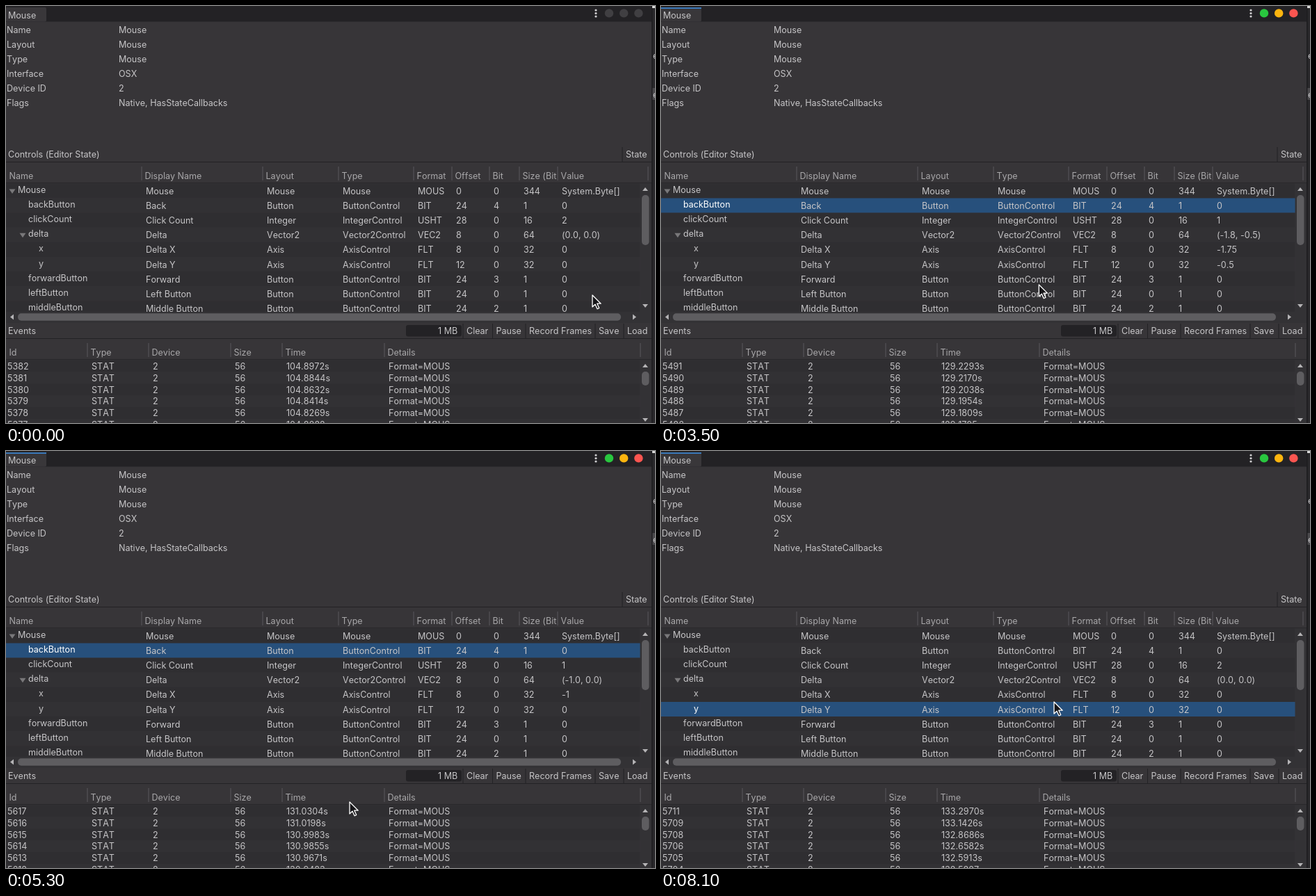
These frames come from a looping animation (933x600 px, 8.6 s). An HTML page:

```html
<!DOCTYPE html>
<html lang="en">
<head>
<meta charset="utf-8">
<title>Mouse</title>
<style>
html, body { margin: 0; width: 100%; height: 100%; overflow: hidden; background: #373538; }
svg { display: block; width: 933px; height: 600px; }
text { font: 12.55px Inter, sans-serif; font-kerning: none; font-feature-settings: "calt" 0; fill: #c6c5c7; white-space: pre; }
.head { fill: #a8a7a9; }
.on { fill: #fff; }
</style>
</head>
<body>
<svg id="stage" viewBox="0 0 933 600"></svg>
<script>
const LOOP = 8600, STEP = 100;
const FOCUS = 21, PRESS = 70, SECOND_PRESS = 75;
const PANEL = '#373538', EDGE = '#232225', THUMB = '#5e5d60', ARROW = '#b5b4b6';
const stripe = i => i % 2 ? '#323134' : '#2f2e31';
const stage = document.getElementById('stage');
let layer = stage;

function add(tag, attrs) {
  const el = document.createElementNS('http://www.w3.org/2000/svg', tag);
  for (const k in attrs) el.setAttribute(k, attrs[k]);
  return layer.appendChild(el);
}
const rect = (x, y, width, height, fill, rx = 0) => add('rect', { x, y, width, height, fill, rx });
const path = (d, fill, more) => add('path', { d, fill, ...more });
const dot = (cx, cy, r, fill) => add('circle', { cx, cy, r, fill });
// y is the middle of the capitals
function label(x, y, str, cls = '') {
  const el = add('text', { x, y: y + 4.6, class: cls });
  el.textContent = str;
  return el;
}
function clipTo(id, x, y, width, height) {
  layer = stage;
  layer = add('clipPath', { id });
  rect(x, y, width, height, '#000');
  layer = stage;
  layer = add('g', { 'clip-path': `url(#${id})` });
}

// Title bar and device info
rect(0, 0, 933, 600, PANEL);
rect(0, 0, 928, 22.5, EDGE);
rect(0, 2, 58, 20.5, '#39373a', 2);
const tabLine = rect(0, 2, 58, 2, '#3a79bb');
label(3, 13, 'Mouse');
for (const y of [6, 10.5, 15]) dot(848, y, 1.6, '#d0cfd1');
const lights = ['#29c73f', '#fdb50f', '#fb5550']
  .map((color, i) => ({ el: dot(867 + 21.2 * i, 10.4, 6.2, color), color }));

Object.entries({
  'Name': 'Mouse', 'Layout': 'Mouse', 'Type': 'Mouse', 'Interface': 'OSX',
  'Device ID': '2', 'Flags': 'Native, HasStateCallbacks'
}).forEach(([key, val], i) => {
  label(1, 34 + i * 21.15, key);
  label(162, 34 + i * 21.15, val);
});

function toolbar(y, title) {
  rect(0, y, 928, 21, PANEL);
  rect(0, y + 21, 928, 1, EDGE);
  label(3, y + 10.5, title);
}
function header(y, names, cols, end) {
  rect(0, y, 928, 29, PANEL);
  rect(0, y + 29, 928, 1, '#29282b');
  for (const x of [...cols.slice(1).map(c => c - 6), end]) rect(x - .5, y + 6, 1, 20, '#5a595c');
  names.forEach((n, i) => label(cols[i] - 1.5, y + 19, n, 'head'));
}
function scrollBar(top, bottom, thumbY, thumbH) {
  rect(912, top, 16, bottom - top, '#333235');
  path(`M915 ${top + 11}l4-5 4 5z`, ARROW);
  path(`M915 ${bottom - 11}l4 5 4-5z`, ARROW);
  rect(914, thumbY, 10.5, thumbH, THUMB, 5);
}

// Controls
toolbar(203, 'Controls (Editor State)');
rect(885.5, 203, 1, 21, EDGE);
label(891, 213.3, 'State');

const cols = [6, 201, 375, 484, 592, 647, 701, 744, 799];
header(225, ['Name', 'Display Name', 'Layout', 'Type', 'Format', 'Offset', 'Bit', '', 'Value'], cols, 923);
clipTo('sizeHead', 738, 225, 53, 30);
label(742.5, 244, 'Size (Bits)', 'head');

const formats = { Mouse: 'MOUS', Button: 'BIT', Integer: 'USHT', Vector2: 'VEC2', Axis: 'FLT' };
const controls = [
  [0, 'Mouse', 'Mouse', 'Mouse', 0, 0, 344],
  [1, 'backButton', 'Back', 'Button', 24, 4, 1],
  [1, 'clickCount', 'Click Count', 'Integer', 28, 0, 16],
  [1, 'delta', 'Delta', 'Vector2', 8, 0, 64],
  [2, 'x', 'Delta X', 'Axis', 8, 0, 32],
  [2, 'y', 'Delta Y', 'Axis', 12, 0, 32],
  [1, 'forwardButton', 'Forward', 'Button', 24, 3, 1],
  [1, 'leftButton', 'Left Button', 'Button', 24, 0, 1],
  [1, 'middleButton', 'Middle Button', 'Button', 24, 2, 1]
];
const PITCH = 21.12;
clipTo('list', 0, 255, 928, 185);
const bars = [], titles = [], values = {};
controls.forEach(([depth, name, shown, layout, ...sizes], i) => {
  const y = 255.4 + i * PITCH, x = 17 + 15 * depth;
  bars.push(rect(0, y, 911.5, PITCH, stripe(i)));
  titles.push(label(x, y + 8.9, name));
  const type = layout + (depth ? 'Control' : '');
  [shown, layout, type, formats[layout], ...sizes]
    .forEach((c, k) => label(cols[k + 1], y + 10.9, c));
  values[name] = label(cols[8], y + 10.9, depth ? 0 : 'System.Byte[]');
  if (name === 'Mouse' || name === 'delta') path(`M${x - 12.5} ${y + 8}h9l-4.5 6.5z`, '#79787a');
});
layer = stage;
scrollBar(255, 440, 272, 72);
rect(0, 440, 928, 16, '#333235');
path('M11 443.5v8l-5-4z', ARROW);
path('M901 443.5v8l5-4z', ARROW);
rect(17, 442.3, 867, 10.5, THUMB, 5);

// Events
toolbar(457, 'Events');
rect(575, 459, 80, 16.5, EDGE, 3);
label(621, 467, '1 MB');
Object.entries({ Clear: 662, Pause: 704.5, 'Record Frames': 752, Save: 852, Load: 893 }).forEach(([s, x]) => {
  rect(x - 5.5, 457, 1, 21, EDGE);
  label(x, 467, s);
});

const evCols = [6, 123, 211, 329, 403, 550];
header(479, ['Id', 'Type', 'Device', 'Size', 'Time', 'Details'], evCols, 912);
const eventRows = Array.from({ length: 6 }, (_, i) => {
  const y = 509.3 + i * 16.95;
  rect(0, y, 911.5, 16.95, stripe(i));
  const [id, , , , time] = ['', 'STAT', '2', '56', '', 'Format=MOUS']
    .map((s, k) => label(k ? evCols[k] : 2, y + 8.7, s));
  return { id, time };
});
scrollBar(509, 604, 526, 20);

// Sliver of the window behind
rect(928, 0, 5, 600, '#29282b');
rect(928, 0, 1.5, 600, '#1d1c1f');
rect(929, 0, 4, 3, '#d8d8d8');
rect(929.5, 118, 4, 17, '#4a494c');
label(930, 71, 'e');
label(930, 127, 'e');

const cursor = path('M0 0V17L4 13.2 7 19.8 9.7 18.6 6.8 12.2H12.2Z', '#161518',
  { stroke: '#fff', 'stroke-width': 1.3, 'stroke-linejoin': 'round' });

// Event log: id and second where the pace changes, filled in between with jitter
const pace = [
  [5376, 104.78], [5382, 104.8972], [5383, 127.79], [5430, 128.5197], [5552, 129.9312],
  [5617, 131.0304], [5678, 132.0168], [5684, 132.11], [5685, 132.4], [5705, 132.5913],
  [5706, 132.6582], [5708, 132.8686], [5709, 133.1426], [5711, 133.297]
];
const log = [];
const jitter = n => .25 + .15 * Math.sin(n * 2.4);
pace.forEach(([id, time], i) => {
  if (i) {
    const [from, since] = pace[i - 1];
    const gap = (time - since) / (id - from);
    // single skipped ids belong to events that are not listed
    if (id - from > 2) for (let n = from + 1; n < id; n++) log.push({ id: n, time: since + gap * (n - from + jitter(n)) });
  }
  log.push({ id, time });
});

// Pointer path: step, x, y
const keys = [
  [4, 843, 416], [7, 578, 361], [8, 578, 361], [14, 584, 270], [16, 584, 270], [18, 576, 279],
  [21, 576, 279], [25, 525, 356], [28, 565, 377], [30, 612.5, 381], [38, 500, 420],
  [42, 487, 481], [46, 500, 520], [50, 535, 500], [53, 494, 505], [57, 465, 500],
  [60, 567, 539], [63, 567, 530], [64, 567, 529], [66, 567, 529], [70, 565, 361]
];
const same = (a, b) => a[1] === b[1] && a[2] === b[2];
// Speed at a key follows its neighbours; zero beside a rest
function slope(i, c) {
  const a = keys[i - 1], b = keys[i], d = keys[i + 1];
  return !a || !d || same(a, b) || same(b, d) ? 0 : (d[c] - a[c]) / (d[0] - a[0]);
}
function pointer(s) {
  const t = Math.min(Math.max(s, keys[0][0]), keys[keys.length - 1][0]);
  const i = Math.max(1, keys.findIndex(k => k[0] >= t));
  const a = keys[i - 1], b = keys[i], d = b[0] - a[0], u = (t - a[0]) / d;
  const pos = [], vel = [];
  for (const c of [1, 2]) {
    const p = a[c], q = b[c], m = slope(i - 1, c) * d, n = slope(i, c) * d;
    const c2 = 3 * (q - p) - 2 * m - n, c3 = 2 * (p - q) + m + n;
    pos.push(p + u * (m + u * (c2 + u * c3)));
    vel.push((m + u * (2 * c2 + 3 * u * c3)) / d);
  }
  return { pos, vel };
}

const quarter = v => Math.round(v / 2.5) / 4 || 0;

function render(s) {
  const focused = s >= FOCUS;
  tabLine.style.display = focused ? '' : 'none';
  for (const l of lights) l.el.setAttribute('fill', focused ? l.color : '#403f42');

  const { pos, vel } = pointer(s);
  cursor.setAttribute('transform', `translate(${pos})`);

  const selected = !focused ? -1 : s < PRESS ? 1 : 5;
  bars.forEach((bar, i) => bar.setAttribute('fill', i === selected ? '#27507c' : stripe(i)));
  titles.forEach((title, i) => title.setAttribute('class', i === selected ? 'on' : ''));

  const dx = focused ? quarter(vel[0]) : 0, dy = focused ? quarter(-vel[1]) : 0;
  values.clickCount.textContent = focused && s < SECOND_PRESS ? 1 : 2;
  values.delta.textContent = `(${dx.toFixed(1)}, ${dy.toFixed(1)})`;
  values.x.textContent = dx;
  values.y.textContent = dy;
  values.leftButton.textContent = [FOCUS, PRESS, PRESS + 1, SECOND_PRESS].includes(s) ? 1 : 0;

  const clock = 125.7314 + s / 10;
  let newest = log.length - 1;
  while (log[newest].time > clock) newest--;
  eventRows.forEach((row, i) => {
    const e = log[newest - i];
    row.id.textContent = e.id;
    row.time.textContent = e.time.toFixed(4) + 's';
  });
}

const start = performance.now();
let shown = -1;
function tick() {
  const s = Math.floor((performance.now() - start) % LOOP / STEP);
  if (s !== shown) render(shown = s);
  requestAnimationFrame(tick);
}
tick();
</script>
</body>
</html>
```
